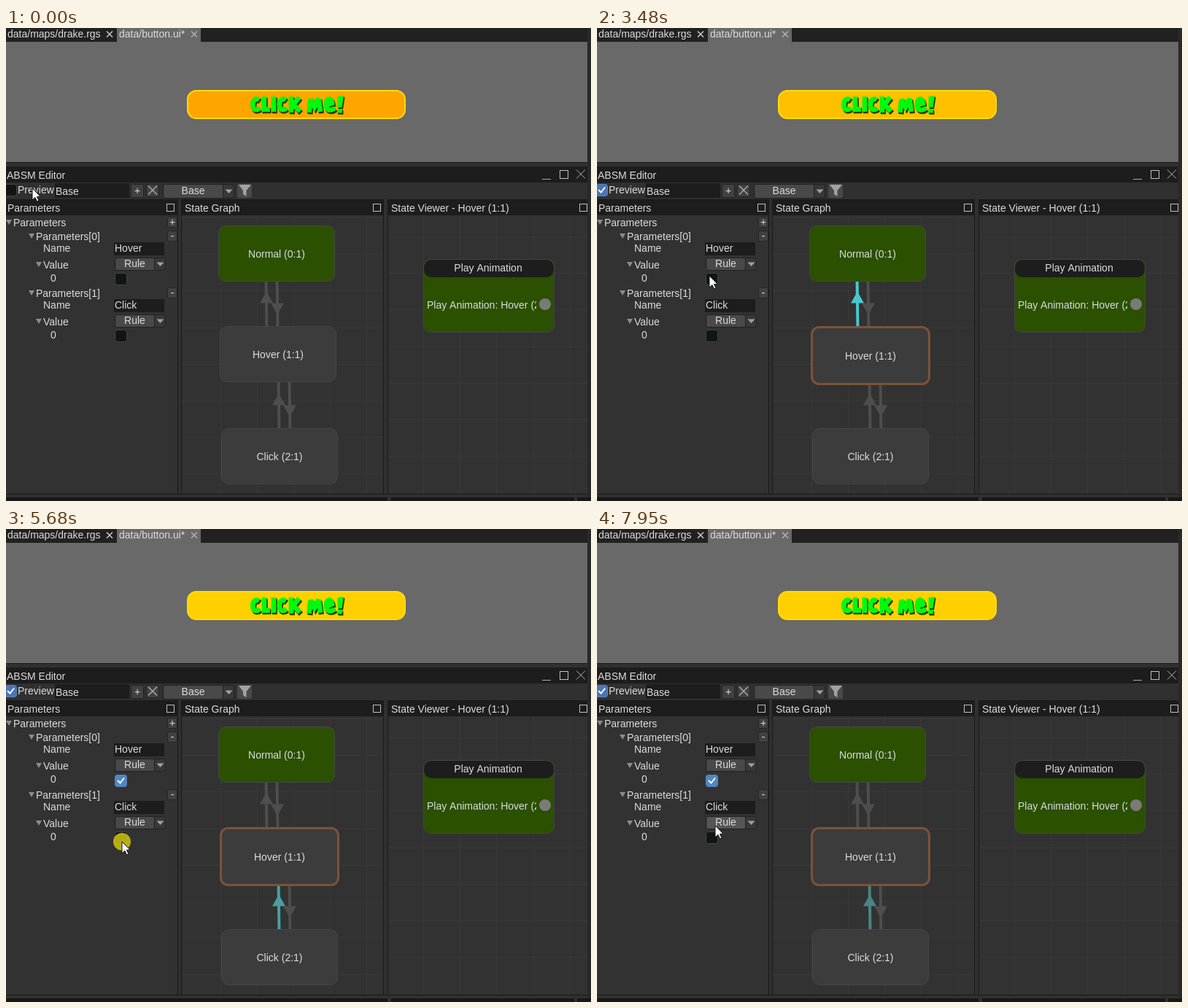
Recreate the animation shown at these times as an HTML page with a canvas. Size 802x649 px, loop 8000 ms.

```html
<!DOCTYPE html>
<html lang="en">
<head>
<meta charset="utf-8">
<title>State machine editor</title>
<style>
  html, body { margin: 0; width: 100%; height: 100%; overflow: hidden; background: #303030; }
  canvas { display: block; }
</style>
</head>
<body>
<canvas id="stage" width="802" height="649"></canvas>
<script>
const ctx = document.getElementById('stage').getContext('2d');
const LOOP = 8000, FADE = 500, PREVIEW_ON = 520, PRESS = 120;
const FONT = '14px "Liberation Sans", Arial, sans-serif';
const INK = '#dcdcdc', DARK = '#1d1d1d', PANEL = '#323232', EDGE = '#191919';
const GREEN = '#2a5000', OUTLINE = '#464646';
const NORMAL = 0, HOVER = 1, CLICK = 2;

// Transitions: start, from, to, length
const moves = [
  [1400, NORMAL, HOVER, 270], [2040, HOVER, NORMAL, 270],
  [2680, NORMAL, HOVER, 270], [3380, HOVER, NORMAL, 270],
  [3700, NORMAL, HOVER, 270], [4450, HOVER, CLICK, 200],
  [5310, CLICK, HOVER, 200], [5750, HOVER, CLICK, 200],
  [6220, CLICK, HOVER, 200], [6720, HOVER, CLICK, 200],
  [7470, CLICK, HOVER, 200]
];

// Pointer: time, x, y
const path = [
  [0, 36, 220], [190, 36, 220], [280, 25, 219], [430, 8, 219], [640, 8, 219],
  [860, 120, 290], [960, 201, 322], [1140, 160, 337], [1240, 154, 340],
  [3810, 154, 340], [4060, 159, 429], [7600, 159, 429], [7800, 162, 407], [8000, 162, 407]
];

const states = [
  { name: 'Normal (0:1)', x: 291, y: 271, fill: GREEN },
  { name: 'Hover (1:1)', x: 293, y: 409, fill: '#3c3c3c' },
  { name: 'Click (2:1)', x: 295, y: 549, fill: '#3c3c3c' }
];

// Arrows: from, to, x, top, bottom
const arrows = [
  [HOVER, NORMAL, 357, 340, 415], [NORMAL, HOVER, 372, 340, 415],
  [CLICK, HOVER, 374, 480, 555], [HOVER, CLICK, 389, 480, 555]
];

const lerp = (a, b, p) => a + (b - a) * p;

function rect(x, y, w, h, color) {
  ctx.fillStyle = color;
  ctx.fillRect(x, y, w, h);
}

function round(x, y, w, h, r, fill, stroke, width = 1) {
  ctx.beginPath();
  ctx.roundRect(x, y, w, h, r);
  if (fill) { ctx.fillStyle = fill; ctx.fill(); }
  if (stroke) { ctx.strokeStyle = stroke; ctx.lineWidth = width; ctx.stroke(); }
}

function poly(points, fill, stroke, width = 1) {
  ctx.beginPath();
  for (let i = 0; i < points.length; i += 2) ctx.lineTo(points[i], points[i + 1]);
  ctx.closePath();
  if (fill) { ctx.fillStyle = fill; ctx.fill(); }
  if (stroke) { ctx.strokeStyle = stroke; ctx.lineWidth = width; ctx.stroke(); }
}

function line(x1, y1, x2, y2, color, width = 1) {
  ctx.beginPath();
  ctx.moveTo(x1, y1);
  ctx.lineTo(x2, y2);
  ctx.strokeStyle = color;
  ctx.lineWidth = width;
  ctx.stroke();
}

function text(s, x, mid, color = INK, align = 'left') {
  ctx.font = FONT;
  ctx.textAlign = align;
  ctx.fillStyle = color;
  ctx.fillText(s, x, mid + 5);
}

function cross(x, y, r, color, width = 1.4) {
  line(x - r, y - r, x + r, y + r, color, width);
  line(x - r, y + r, x + r, y - r, color, width);
}

function frame(x, y, w, h) {
  ctx.strokeStyle = '#c0c0c0';
  ctx.lineWidth = 1;
  ctx.strokeRect(x + .5, y + .5, w, h);
}

const caret = (x, y) => poly([x - 4, y - 3, x + 4, y - 3, x, y + 4], '#8c8c8c');

function smallButton(x, y, w, h, label) {
  round(x + .5, y + .5, w, h, 2, '#414141', '#242424');
  text(label, x + w / 2 + .5, Math.round(y + h / 2), INK, 'center');
}

function dropdown(x, y, w, h, label, over) {
  round(x + .5, y + .5, w - 1, h - 1, 3, '#383838', '#222');
  round(x + 1.5, y + 1, w - 17, h - 2, 2, over ? '#565656' : '#494949');
  line(x + w - 15.5, y + 1, x + w - 15.5, y + h - 1, '#222');
  text(label, x + (w - 15) / 2, Math.floor(y + h / 2 - .5), INK, 'center');
  const cx = x + w - 7.5, cy = y + h / 2;
  poly([cx - 5, cy - 2.5, cx + 5, cy - 2.5, cx, cy + 3], '#a0a0a0');
}

function checkbox(x, y, on, over) {
  const fill = over ? '#4a75b6' : '#4f87c1';
  round(x + .5, y + .5, 16, 16, 3, on ? fill : '#131414', on ? '#5583b8' : '#454545');
  if (!on) return;
  ctx.beginPath();
  ctx.moveTo(x + 4, y + 8);
  ctx.lineTo(x + 7.5, y + 11.5);
  ctx.lineTo(x + 13, y + 4.5);
  ctx.strokeStyle = '#fff';
  ctx.lineWidth = 2;
  ctx.stroke();
}

function machineAt(t) {
  const m = { border: -1, from: NORMAL, to: NORMAL, p: 1, hover: false, click: false, glow: {} };
  for (const [start, from, to, length] of moves) {
    if (t < start) break;
    const p = Math.min(1, (t - start) / length);
    Object.assign(m, { from, to, p, hover: to !== NORMAL, click: to === CLICK });
    if (p === 1) m.border = to;
    m.glow[from + '>' + to] = Math.max(0, 1 - Math.max(0, t - start - length) / FADE);
  }
  return m;
}

function pointerAt(t) {
  const i = Math.max(1, path.findIndex(k => k[0] > t));
  const [t0, x0, y0] = path[i - 1], [t1, x1, y1] = path[i];
  const p = (t - t0) / (t1 - t0);
  return [Math.round(lerp(x0, x1, p)), Math.round(lerp(y0, y1, p))];
}

function titleStrokes() {
  const go = (...p) => {
    ctx.moveTo(p[0], p[1]);
    for (let i = 2; i < p.length; i += 2) ctx.lineTo(p[i], p[i + 1]);
  };
  const letterC = x => {
    ctx.moveTo(x + 12, 99);
    ctx.bezierCurveTo(x + 6, 94.5, x + 3, 101, x + 3.4, 106);
    ctx.bezierCurveTo(x + 4, 113.5, x + 9, 113, x + 13, 110);
  };
  ctx.beginPath();
  letterC(335);
  go(354, 94, 353.8, 111.7, 362, 111.5);
  go(367, 94, 367, 115);
  letterC(371.5);
  go(391, 94, 391, 116);
  go(402, 95, 394, 105, 403, 114.5);
  go(415.5, 116, 417.5, 98, 423, 108, 428.5, 97, 431, 115);
  ctx.moveTo(439, 106);
  ctx.lineTo(447, 103);
  ctx.bezierCurveTo(446, 95, 439, 96, 439, 104);
  ctx.bezierCurveTo(438.5, 114, 445, 114, 451, 110);
  go(457.5, 111, 457.5, 116.5);
  ctx.stroke();
  ctx.beginPath();
  go(454.5, 94, 463, 93, 460.5, 109, 454.5, 109);
  ctx.fill();
}

function title(dx) {
  ctx.lineWidth = 6.8;
  ctx.lineJoin = 'miter';
  ctx.miterLimit = 3;
  for (const [off, color] of [[2.4, 'rgba(10,30,5,.55)'], [1.6, '#102c08'], [0, '#00fa0c']]) {
    ctx.save();
    ctx.translate(dx + off * .7, dx + off);
    ctx.strokeStyle = ctx.fillStyle = color;
    titleStrokes();
    ctx.restore();
  }
}

function preview(m) {
  rect(0, 0, 802, 19, '#212121');
  rect(152, 0, 115, 19, '#696969');
  rect(0, 19, 797, 165, '#696969');
  text('data/maps/drake.rgs', 2, 8);
  cross(142, 8.5, 4, '#d0d0d0');
  text('data/button.ui*', 155, 8);
  cross(258, 8.5, 4, '#b4b4b4');

  const tone = [165, 208, 150];
  const g = Math.round(lerp(tone[m.from], tone[m.to], m.p));
  const press = lerp(m.from === CLICK ? 1 : 0, m.to === CLICK ? 1 : 0, m.p);
  const move = Math.round(4 * press), shrink = 7.5 * Math.pow(press, .7);
  round(249 + move, 86 + move, 298 - shrink, 38 - shrink, 12 + 3 * press,
    `rgb(255,${g},0)`, '#ffdc08', 2);
  title(m.from === CLICK && m.p > .1 && m.p < 1 ? -1 : 0);
}

function chrome(t) {
  rect(0, 184, 802, 1, EDGE);
  rect(0, 190, 797, 22, DARK);
  text('ABSM Editor', 1, 202);
  line(735, 207.5, 747, 207.5, '#a8a8a8');
  frame(759, 195, 11, 11);
  cross(788, 200.5, 6, '#b4b4b4', 1);

  checkbox(-2, 214, t >= PREVIEW_ON, true);
  text('Preview', 16, 222);
  rect(67, 213, 102, 20, DARK);
  text('Base', 68, 224);
  smallButton(171, 214, 17, 18, '+');
  round(192.5, 214.5, 17, 17, 2, '#414141', '#262626');
  cross(201, 222.5, 6, '#a8a8a8', 1.5);
  dropdown(215, 214, 98, 20, 'Base');
  round(317, 214, 20, 19, 2, '#494949');
  poly([319, 215, 336, 215, 329.5, 223, 329.5, 231, 325, 228, 325, 223], '#a2a2a2');
}

function panels() {
  for (const [x, w, name, tx] of [[0, 236, 'Parameters', 2], [240, 278, 'State Graph', 245], [523, 275, 'State Viewer - Hover (1:1)', 528]]) {
    rect(x, 235, w, 405, EDGE);
    rect(x ? x + 1 : 0, 236, w - (x ? 2 : 1), 403, PANEL);
    rect(x ? x + 1 : 0, 236, w - (x ? 2 : 1), 21, DARK);
    text(name, tx, 247);
    frame(x + w - (x === 523 ? 12 : x ? 15 : 16), 241, 10, 10);
  }
  const grid = '#393939';
  for (let i = 0; i < 5; i++) {
    rect(294 + i * 50, 257, 1, 382, grid);
    rect(572 + Math.round(i * 50.2), 257, 1, 382, grid);
  }
  for (let i = 0; i < 8; i++) {
    rect(241, 260 + Math.round(i * 50.2), 276, 1, grid);
    if (i < 7) rect(524, 286 + Math.round(i * 50.2), 273, 1, grid);
  }
  rect(0, 639, 802, 1, EDGE);
  rect(0, 644, 802, 5, '#181818');
  rect(523, 644, 5, 5, '#303030');
  rect(779, 644, 4, 5, '#303030');
  rect(797, 0, 5, 644, '#292929');
}

function parameter(i, name, dy, on, overBox, overRule) {
  ctx.save();
  ctx.translate(0, dy);
  caret(35, 285);
  text(`Parameters[${i}]`, 41, 286);
  smallButton(221, 278, 13, 14, '-');
  text('Name', 51, 302);
  rect(148, 294, 69, 18, DARK);
  text(name, 149, 302);
  caret(45, 324);
  text('Value', 51, 325);
  dropdown(149, 315, 70, 18, 'Rule', overRule);
  text('0', 61, 343);
  checkbox(149, on ? 337 : 336, on, overBox);
  ctx.restore();
}

function parameters(m, x, y) {
  caret(4, 266);
  text('Parameters', 10, 267);
  smallButton(221, 259, 13, 14, '+');
  const inX = x > 149 && x < 166;
  parameter(0, 'Hover', 0, m.hover, inX && y > 335 && y < 353, false);
  parameter(1, 'Click', m.hover ? 79 : 78, m.click, inX && y > 414 && y < 432, inX && y > 393 && y < 411);
}

function graph(m) {
  for (const [from, to, x, top, bottom] of arrows) {
    const glow = m.glow[from + '>' + to] || 0;
    const color = `rgb(${lerp(78, 72, glow)},${lerp(78, 200, glow)},${lerp(78, 206, glow)})`;
    const mid = (top + bottom) / 2, tip = mid + (to > from ? 16 : -16);
    line(x - .5, top, x + .5, bottom, color, 4);
    poly([x - 9, mid, x + 9, mid, x, tip], color);
  }
  states.forEach((s, i) => {
    const on = m.border === i, grow = on ? 2 : 0;
    if (on) round(s.x + 1.5, s.y + 1.5, 161, 78, 10, s.fill, '#7d5238', 3);
    else round(s.x + .5, s.y + .5, 159, 76, 10, s.fill, OUTLINE);
    text(s.name, s.x + 80 + grow, s.y + 39 + grow, INK, 'center');
  });
}

function viewer() {
  round(572.5, 317.5, 179, 100, 10, GREEN, OUTLINE);
  round(573, 318, 178, 24, 10, DARK);
  text('Play Animation', 661, 329, INK, 'center');
  ctx.save();
  ctx.beginPath();
  ctx.rect(573, 365, 154, 30);
  ctx.clip();
  text('Play Animation: Hover (2:1)', 577, 380);
  ctx.restore();
  round(731, 371, 16, 16, 8, '#7a7a7a');
}

function pointer(t, x, y) {
  const clicks = [PREVIEW_ON, ...moves.map(m => m[0])];
  if (clicks.some(c => t >= c - PRESS && t < c + 10)) {
    round(x - 12, y - 12, 24, 24, 12, 'rgba(205,194,20,.87)');
  }
  ctx.save();
  ctx.translate(x, y);
  poly([0, 0, 0, 16, 4, 12.5, 6.5, 18, 9, 17, 6.5, 11.5, 11, 11], '#fff', '#111');
  ctx.restore();
}

function draw(t) {
  const m = machineAt(t), [x, y] = pointerAt(t);
  rect(0, 0, 802, 649, '#303030');
  preview(m);
  chrome(t);
  panels();
  parameters(m, x, y);
  graph(m);
  viewer();
  pointer(t, x, y);
}

const begin = performance.now();
function tick() {
  draw((performance.now() - begin) % LOOP);
  requestAnimationFrame(tick);
}
tick();
</script>
</body>
</html>
```
